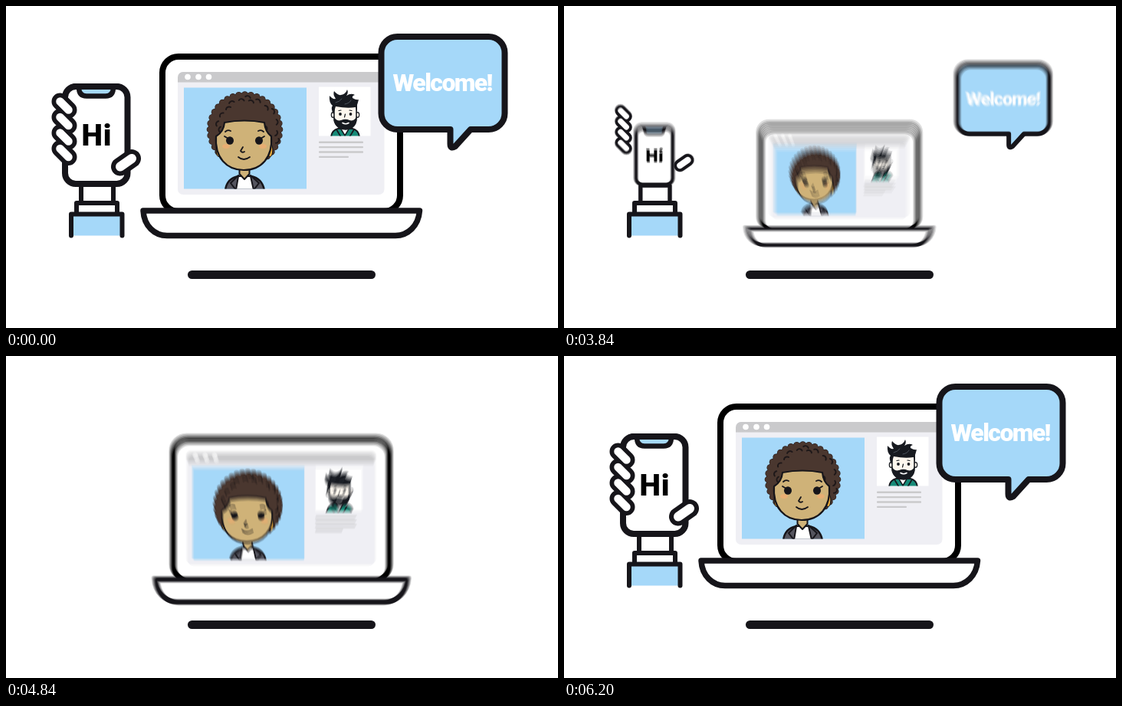
Recreate the animation shown at these times as an HTML page with a canvas. Size 720 by 420 pixels, loop 6.24 s.

```html
<!DOCTYPE html>
<html lang="en">
<head>
<meta charset="utf-8">
<title>Welcome call</title>
<style>
  html, body { margin: 0; width: 100%; height: 100%; overflow: hidden; background: #fff; }
  canvas { display: block; }
</style>
</head>
<body>
<canvas id="stage" width="720" height="420"></canvas>
<script>
const LOOP = 6240, STEP = 40, SHUTTER = 20, SAMPLES = 8;
const INK = '#16151a', BLUE = '#a5d8f9', WHITE = '#fff', GREY = '#cacacc';
const HAIR = '#4a372f', SKIN = '#cfb278', BEARD = '#171a20';

const screen = document.getElementById('stage').getContext('2d');
const buffer = document.createElement('canvas');
buffer.width = 720;
buffer.height = 420;
const c = buffer.getContext('2d');
c.lineCap = c.lineJoin = 'round';

const clamp = x => Math.max(0, Math.min(1, x));
const easeOut = x => 1 - (1 - x) ** 3;
const backOut = x => 1 + 1.9 * (x - 1) ** 3 + 0.9 * (x - 1) ** 2;

function shape(d, fill, stroke, width) {
  const path = new Path2D(d);
  if (fill) { c.fillStyle = fill; c.fill(path); }
  if (stroke) { c.strokeStyle = stroke; c.lineWidth = width; c.stroke(path); }
}

function box(x, y, w, h, radius, fill, stroke, width) {
  c.beginPath();
  c.roundRect(x, y, w, h, radius);
  c.fillStyle = fill;
  c.fill();
  if (stroke) { c.strokeStyle = stroke; c.lineWidth = width; c.stroke(); }
}

function oval(x, y, rx, ry, fill) {
  c.beginPath();
  c.ellipse(x, y, rx, ry, 0, 0, 7);
  c.fillStyle = fill;
  c.fill();
}

function label(text, x, y, font, color, spacing) {
  c.font = font;
  c.fillStyle = color;
  c.letterSpacing = spacing;
  c.textAlign = 'center';
  c.fillText(text, x + parseFloat(spacing) / 2, y);
}

function scaled(x, y, scale, draw, dy = 0) {
  if (scale <= 0.005) return;
  c.save();
  c.translate(x, y + dy);
  c.scale(scale, scale);
  c.translate(-x, -y);
  draw();
  c.restore();
}

// Shrinks away at `leave`, pops back in at `enter`.
const size = (t, leave, enter, duration = 400) => t < 4300
  ? 1 - clamp((t - leave) / 300) ** 1.5
  : backOut(clamp((t - enter) / duration));

function woman() {
  c.save();
  c.beginPath();
  c.rect(232, 106, 160, 132.5);
  c.clip();
  for (const [grow, color] of [[0.7, '#2b2020'], [0, HAIR]]) {
    oval(311.5, 161, 47 + grow, 47 + grow, color);
    for (let i = 0; i < 36; i++) {
      const a = i * Math.PI / 18;
      oval(311.5 + 45.5 * Math.cos(a), 161 + 45.5 * Math.sin(a), 3.6 + grow, 3.6 + grow, color);
    }
  }
  c.strokeStyle = '#1e1819';
  c.lineWidth = 2;
  for (let i = 0; i < 24; i++) {
    const a = i * 2.4, r = 25 + (i * 7) % 19;
    c.beginPath();
    c.arc(311.5 + r * Math.cos(a), 160 + r * Math.sin(a), 4, a - 0.8, a + 1.2);
    c.stroke();
  }
  shape('M286 240 Q288 225 303 222 H320 Q334 225 337 240Z', '#55555f', INK, 2.4);
  shape('M303 222 L300 240 H323 L319 222Z', WHITE, INK, 2);
  shape('M304.5 207 V219 L311 226 L317.5 219 V207Z', SKIN, INK, 2);
  shape('M303 221 L293 231 L300 240 M319 221 L330 231 L323 240', null, INK, 2);
  for (const x of [277.5, 344.5]) {
    oval(x, 188, 4, 9, INK);
    oval(x, 188, 2.8, 8, '#f0ae3c');
  }
  shape('M285 152 Q311 147 337 152 Q338 164 346 170 C348 198 333 214 310 214 C288 214 272 198 274 170 Q284 164 285 152Z', SKIN, INK, 2.2);
  for (const x of [287, 335]) oval(x, 183, 5, 3, '#e8ae73');
  for (const x of [292, 330]) oval(x, 175.5, 5, 5.2, INK);
  shape('M290 173 L285 170 M332 173 L337 170 M286 164 Q289 161 293 163 M329 163 Q333 161 336 164', null, INK, 1.8);
  shape('M309 184 L306 189 Q308 192 311 190 M303 197 Q310 203 318 197', null, INK, 1.8);
  c.restore();
}

function man() {
  c.save();
  c.beginPath();
  c.rect(408, 105, 68, 64.5);
  c.clip();
  shape('M424 171 Q425 162 433 160 H452 Q460 162 461 171Z', '#168a78', BEARD, 2);
  shape('M436 159 L442 169 L448 159Z', WHITE, BEARD, 1.5);
  shape('M431 161 L437 171 M454 161 L448 171', null, BEARD, 1.8);
  for (const x of [426.5, 458.5]) {
    oval(x, 142, 2.8, 4, BEARD);
    oval(x, 142, 1.6, 2.8, '#fdf7ee');
  }
  shape('M428 130 H457 V147 Q456 160 443 161 Q429 160 428 147Z', '#fdf7ee', BEARD, 1.5);
  shape('M427.5 143 Q430 151 437 149 Q443 146.5 448 149 Q455 151 457.5 143 V150 Q455 161 443 161 Q430 160 427.5 150Z', BEARD);
  shape('M439 152.5 Q443 155 447 152.5', null, WHITE, 1.6);
  oval(436, 141, 1.9, 2.1, BEARD);
  oval(449.5, 141, 1.9, 2.1, BEARD);
  shape('M434 136.5 L437 136 M448 136 L451 136.5 M442.5 141 L441.5 145', null, BEARD, 1.2);
  shape('M427 141 Q423 133 426 130 Q421 126 422 117 Q426 122 430 121 Q426 115 428 111 Q433 117 437 116 Q443 115 445 109 Q447 113 444 117 Q450 113 455 116 Q451 117 452 120 Q457 123 460 122 Q459 126 458 129 L458 140 L456 132 Q445 134 430 131Z', BEARD);
  shape('M430 126 Q435 125 438 121 M442 128 Q448 127 450 123', null, '#59616b', 0.8);
  c.restore();
}

function laptop() {
  box(204, 66, 310, 202, 21, WHITE, '#000', 8);
  box(224, 86, 269.5, 160, 7, '#efeff4');
  box(224, 86, 269.5, 13.5, [7, 7, 0, 0], GREY);
  for (const x of [237, 251, 264.5]) oval(x, 92.5, 3.8, 3.8, WHITE);
  box(232, 106.5, 160, 132, 0, BLUE);
  box(408, 105.5, 67.5, 64, 0, WHITE);
  woman();
  man();
  [58, 58, 58, 39].forEach((w, i) => box(408, 176.5 + i * 6.4, w, 2.4, 1, GREY));
  shape('M179 267 H539.5 C538 287 524 299.5 508 299.5 H210 C194 299.5 180 287 179 267Z', WHITE, INK, 7.5);
}

function bubble() {
  shape('M510.5 40 H629.5 A21 21 0 0 1 650.5 61 V140 A21 21 0 0 1 629.5 161 H606 L586 183 Q579.5 187 579.5 180 V161 H510.5 A21 21 0 0 1 489.5 140 V61 A21 21 0 0 1 510.5 40Z', BLUE, INK, 8);
  label('Welcome!', 570, 111, '900 32px Roboto, sans-serif', WHITE, '-1.6px');
}

const sleeve = () => shape('M85 299.5 V271.5 H151.5 V299.5', BLUE, INK, 6);
const cuff = () => shape('M92 270 V257 H145 V270', WHITE, INK, 6);
const wrist = () => shape('M98 256 V232 H140 V256', WHITE, INK, 6);

function phone() {
  box(77, 105, 81.5, 127, 14, WHITE, INK, 8);
  shape('M95 106 Q95 117.5 105 117.5 H130 Q140 117.5 140 106', BLUE, INK, 6.5);
  shape('M90 105 H145', null, INK, 8);
  label('Hi', 118, 182, '800 39px Roboto, sans-serif', '#000', '1px');
}

function capsule(d, outer, inner) {
  shape(d, null, INK, outer);
  shape(d, null, WHITE, inner);
}

const fingers = () => capsule(
  [0, 20.5, 41, 61.5].map(y => `M70.5 ${124.5 + y} L81.5 ${135.5 + y}`).join(''), 22, 10.5);
const thumb = () => capsule('M149 209.5 L164 199', 24, 12);

function scene(t) {
  c.fillStyle = WHITE;
  c.fillRect(0, 0, 720, 420);

  const leaving = t < 4300;
  const p = leaving ? clamp((t - 3665) / 360) : clamp((t - 4642) / 360);
  const settle = leaving ? 0 : Math.sin(Math.PI * clamp((t - 4960) / 400));
  scaled(359.5, 303, leaving ? 1 - p ** 1.5 : easeOut(p), laptop,
    47 * (leaving ? p * p : 1 - p) - settle);

  scaled(118, 256, size(t, 3780, 5200), wrist);
  scaled(118, 271, size(t, 3840, 5130), cuff);
  scaled(118, 302, size(t, 3900, 4960, 457), sleeve);
  scaled(118, 234, size(t, 3674, 5280), phone);
  scaled(81, 162, size(t, 3700, 5380), fingers);
  scaled(156, 205, size(t, 3700, 5420), thumb);
  scaled(582, 184, size(t, 3720, 5280), bubble);

  const half = 122.5 * (leaving ? 1 - clamp((t - 3980) / 300) ** 2 : easeOut(clamp((t - 4320) / 400)));
  if (half > 0.5) box(359.5 - half, 345, 2 * half, 11, 5.5, INK);
}

// Averages several moments of one exposure to give motion blur.
function render(t) {
  const samples = t >= 3680 ? SAMPLES : 1;
  for (let i = 0; i < samples; i++) {
    scene(samples > 1 ? t + ((i + 0.5) / samples - 0.5) * SHUTTER : t);
    screen.globalAlpha = 1 / (i + 1);
    screen.drawImage(buffer, 0, 0);
  }
}

const begin = performance.now();
let shown = -1;
function tick() {
  const t = Math.floor((performance.now() - begin) % LOOP / STEP) * STEP;
  if (t !== shown) render(shown = t);
  requestAnimationFrame(tick);
}
tick();
</script>
</body>
</html>
```
